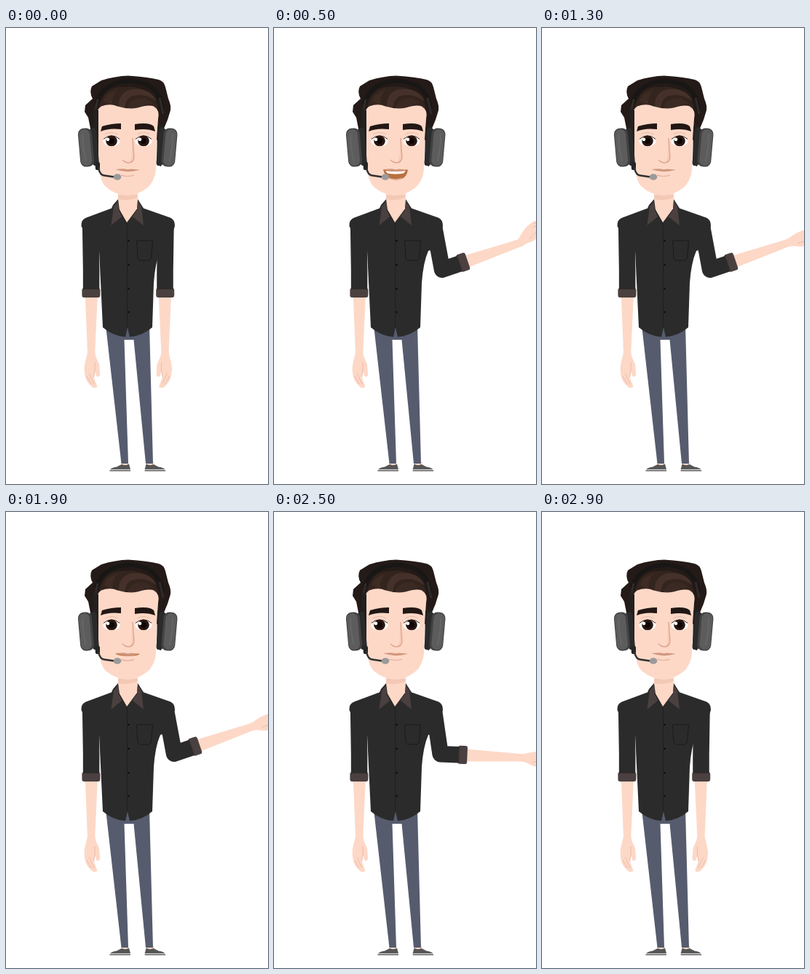
Write an HTML page with a canvas that moves like this. It is 360x626 px and loops after 3 s.

```html
<!DOCTYPE html>
<html lang="en">
<head>
<meta charset="utf-8">
<title>Headset presenter</title>
<style>
html, body { margin: 0; width: 100%; height: 100%; overflow: hidden; background: #fff; }
canvas { display: block; width: 360px; height: 626px; }
</style>
</head>
<body>
<canvas id="stage" width="360" height="626"></canvas>
<script>
const ctx = document.getElementById('stage').getContext('2d');
const LOOP = 3000, STEP = 100;
const SKIN = '#fdd8c7', CREASE = '#e9b8a2', SHIRT = '#2b2b2b', CUFF = '#4b4040';
const JEANS = '#565c6e', HAIR = '#241a17', AXIS = 167.8;

const clamp = v => Math.max(0, Math.min(1, v));
const ramp = (t, from, to) => clamp((t - from) / (to - from));
const smooth = u => u * u * (3 - 2 * u);
const cubic = u => u < .5 ? 4 * u ** 3 : 1 - 4 * (1 - u) ** 3;
const rad = deg => deg * Math.PI / 180;

function fill(d, color) {
  ctx.fillStyle = color;
  ctx.fill(new Path2D(d));
}
function line(d, color, width = 1) {
  ctx.strokeStyle = color;
  ctx.lineWidth = width;
  ctx.stroke(new Path2D(d));
}
function oval(x, y, rx, ry, color) {
  ctx.beginPath();
  ctx.ellipse(x, y, rx, ry, 0, 0, 7);
  ctx.fillStyle = color;
  ctx.fill();
}
function box(x, y, w, h, r, color) {
  ctx.beginPath();
  ctx.roundRect(x, y, w, h, r);
  ctx.fillStyle = color;
  ctx.fill();
}
function group(draw) {
  ctx.save();
  draw();
  ctx.restore();
}
function mirrored(axis, draw) {
  group(() => {
    ctx.translate(2 * axis, 0);
    ctx.scale(-1, 1);
    draw();
  });
}

// Hanging hand with the wrist at the origin and the thumb towards -x.
function hand() {
  fill('M-5 -3 L5 -3 C6 5 9 11 9.5 20 C9.5 27 8 35 5 39 L-1 46 C-5 48 -9 47 -8 44 ' +
       'L-4 34 L-5 24 L-7 31 C-10 33 -12 31 -12 28 L-11 15 C-9 9 -6 6 -5 -3 Z', SKIN);
  line('M-5 12 L-5 24 L-3 32 M6 31 L0 42 M3 27 L-4 42', CREASE, .9);
}

// Elbow at the origin, forearm pointing down.
function forearm(handTilt) {
  fill('M-9 30 L8.5 30 L5 116 L-5 116 Z', SKIN);
  group(() => {
    ctx.translate(0, 114);
    ctx.rotate(-handTilt);
    hand();
  });
  box(-12.3, 24, 25, 13, 3, CUFF);
  line('M-11 25.5 L11.5 25.5', '#352e2d');
}

function arm(upper, lower, tilt) {
  const sx = 219.5, sy = 270, length = 63;
  const ex = sx - 1 + length * Math.sin(upper), ey = sy + length * Math.cos(upper);
  group(() => {
    ctx.translate(ex, ey);
    ctx.rotate(-lower);
    forearm(tilt);
  });
  ctx.lineJoin = 'round';
  const cx = ex + 25 * Math.sin(lower), cy = ey + 25 * Math.cos(lower);
  line(`M${sx} ${sy} L${ex} ${ey} L${cx} ${cy}`, SHIRT, 22.5);
}

function shoe() {
  fill('M158 596 L168 596 L168 601 L158 601 Z', SKIN);
  fill('M143 606 Q146 603 152 602.5 L159 599 Q164 601.5 169 598.5 L171 606 Z', '#555');
  line('M144 606.3 L171 606.3', '#ccc', .8);
  line('M142.5 607.7 L171 607.7', '#5a5a5a', 1.4);
}

function legs() {
  shoe();
  mirrored(AXIS + 13, shoe);
  fill('M137 408 L197 408 L202 598 L192 598 L175.5 428 L162.5 428 L168 598 L158.5 598 Z', JEANS);
}

function torso(drop) {
  fill('M154 222 L181 222 L181 250 L166 270 L154 250 Z', SKIN);
  fill(`M154 229 L181 229 L180 ${233 + drop} Q167 238 154 ${235 + drop} Z`, '#f3c8b5');
  fill(`M154 ${235 + drop} L147 243 L145 247.5 L110 260.5 Q103 263 103.5 272 L123 312 L128 306
    L133 411 Q147 423 164 424 L167 411 L170 424 Q187 423 201 411
    L203 350 Q205 322 212 306 L221 303 L232 272 Q232 263 226 260.5
    L189 247.5 L181 ${235 + drop} L180 250 L166 268 L156 250 Z`, SHIRT);
  fill('M154 238 L148 245 L144.5 271 L159 259 L155 249 Z', CUFF);
  fill('M181 238 L186 245 L189 271 L174 259 L180 249 Z', CUFF);
  line('M155 249 L166 268 L180 249', '#282424', 1.2);
  line('M166.5 268 L166.5 411', '#202020');
  for (const y of [292, 325, 358, 390]) oval(168.5, y, 1.3, 1.3, '#0b0b0b');
  line('M179.5 292 L201.5 292 L199.5 316 L197 319 L183 319 L181 316 Z', '#1a1a1a', 1);
}

function eye(x, lid) {
  const y = 155;
  group(() => {
    ctx.beginPath();
    ctx.ellipse(x, y, 11.5, 7.5, 0, 0, 7);
    ctx.clip();
    ctx.fillStyle = '#fff';
    ctx.fillRect(x - 12, y - 8, 24, 16);
    oval(x, y, 7.8, 7.6, '#2a1510');
    oval(x, y, 4, 4, '#0d0706');
    oval(x - 5, y - 2, 2.3, 2.3, '#fff');
    ctx.fillStyle = '#f0cab4';
    ctx.fillRect(x - 12, y - 8, 24, 16 * lid);
  });
  if (lid > .6) {
    fill(`M${x - 10} 155 Q${x} 157.5 ${x + 10} 155 Q${x + 7} 162 ${x} 162 Q${x - 7} 162 ${x - 10} 155 Z`, '#211712');
    line(`M${x - 11} 150 Q${x} 142 ${x + 11} 150`, '#deb79e');
  } else {
    line(`M${x - 11} 152.5 Q${x} ${143 + lid * 8} ${x + 11} 152.5`, '#35211b', 1);
    line(`M${x - 9} 146 Q${x} 141 ${x + 9} 146`, '#e5bda7');
  }
}

function mouth(open) {
  if (open > .08) {
    const low = 196 + 20 * open;
    fill(`M150 194 Q167 197 184 194.5 Q182 ${low} 168 ${low} Q153 ${low} 150 194 Z`, '#b9713f');
    if (open > .4) fill(`M153 196 Q167 198 181 196 L178 ${197 + 4 * open} Q167 ${199 + 4 * open} 156 ${197 + 4 * open} Z`, '#fff');
  }
  fill('M150 194 Q160 193 164 193.5 Q167 195 171 193.5 L184 194.5 Q167 200 150 194 Z', '#d0977d');
  const lip = 202 + 7 * open;
  line(`M158 ${lip} Q167 ${lip + 3} 176 ${lip}`, '#e3ae98', 1.2);
}

function earCup() {
  group(() => {
    ctx.translate(110, 164);
    ctx.rotate(rad(-5));
    box(7, -26, 9, 52, 4, '#2b2b2b');
    box(-9.5, -26.5, 19, 53, 8, '#424242');
    box(-8.5, -25, 15, 50, 7, '#5c5c5c');
    line('M-3 -19 Q-5 0 -2 19', '#666', 2);
  });
}

function hair() {
  fill(`M124 152 L116 138 L113 123 L108 115 L109 106 L119 97 Q114 88 118 80 L131 72
    Q150 66 168 65.5 Q195 67 210 71 Q217 73 219 81 L223 97 Q227 106 226 113
    L222 126 L217 138 L211 158 L206 152 L206 118 L127 118 Z`, HAIR);
  fill('M128 108 C133 89 144 80 160 81 C181 78 202 86 209 110 Z', '#33241e');
  fill('M155 112 C153 91 166 82 181 84 C195 84 204 92 207 101 Q191 88 172 94 Q164 97 163 112 Z', '#45312a');
  fill('M166 112 Q169 96 190 96 L201 103 Q190 104 180 112 Z', '#3b2a24');
  fill('M134 100 Q140 87 154 85 Q145 93 146 106 Z', '#3d2b24');
  line('M124 104 Q130 82 153 75 Q174 69 196 79 Q211 87 215 111', '#191716', 6);
  line('M122 116 L126 98 M216 118 L211 96', '#302b29', 3);
}

function head(lid, open) {
  hair();
  fill(`M127 126 Q122 113 131 107.5 Q143 103 153 107.5 Q168 112 181 109.5
    Q195 105 203 107.5 Q212 113 209 125 L207 154 L206 194 Q204 213 191 221.5
    Q179 230 166 230 Q149 228.5 137 218 Q130 211 128 194 L126 158 Z`, SKIN);
  fill('M130 142 L132 135 Q145 131 158 131 L158 139 Q141 137 130 142 Z', '#211714');
  fill('M177 132 Q197 129 203 135 L205 142 Q193 137 177 140 Z', '#211714');
  eye(145, lid);
  eye(189, lid);
  fill('M173 150 L176 180 Q174 187 167 186 Q173 182 173 174 Z', '#f6c9b5');
  line('M174 151 L176 177 Q176 184 169 185 Q164 185 160 181', '#d9a18a', 1.2);
  mouth(open);

  fill('M120 110 L127 113 L127 192 L123 194 L119 145 Z', '#222120');
  fill('M208 136 L214 132 L218 140 L213 190 L207 188 Z', '#222120');
  earCup();
  mirrored(167.2, earCup);
  box(123, 184, 6, 11, 2, '#252525');
  ctx.lineCap = 'round';
  line('M127 192 Q129 202 135 202.5 L149 204.5', '#303030', 2.4);
  ctx.lineCap = 'butt';
  oval(153, 204.5, 5.3, 4.3, '#9a9a9a');
}

function draw(t) {
  const fall = smooth(ramp(t, 2380, 2800));
  const upper = 11.5 * smooth(ramp(t, 0, 400)) * (1 - fall);
  const lower = 109 * cubic(ramp(t, 90, 500)) * (1 - fall);
  const wave = 26 * smooth(ramp(t, 300, 500)) * (1 - smooth(ramp(t, 500, 800)));
  const drag = 13 * Math.sin(Math.PI * ramp(t, 100, 320));
  const lid = clamp(1 - Math.abs(t - 200) / 130);
  const talking = t >= 300 && t <= 2400;
  const open = talking ? Math.cos(Math.PI * (t - 500) / 320) ** 2 * .62 : 0;

  ctx.fillStyle = '#fff';
  ctx.fillRect(0, 0, 360, 626);
  legs();
  mirrored(AXIS, () => arm(0, 0, 0));
  arm(rad(upper), rad(lower), rad(wave - drag));
  torso(lid);
  group(() => {
    ctx.translate(0, 2 * lid);
    head(lid, open);
  });
}

const start = performance.now();
function tick() {
  const t = (performance.now() - start) % LOOP;
  draw(Math.floor(t / STEP) * STEP);
  requestAnimationFrame(tick);
}
tick();
</script>
</body>
</html>
```
